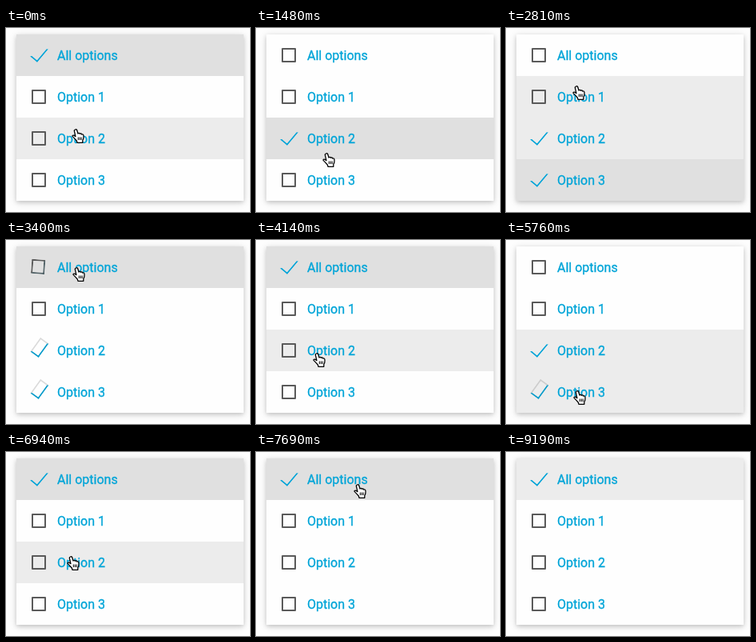
These frames come from a looping animation (305x230 px, 9290 ms). An HTML page:

```html
<!DOCTYPE html>
<html lang="en">
<head>
<meta charset="utf-8">
<title>Option list</title>
<style>
  html, body { margin: 0; width: 100%; height: 100%; overflow: hidden; background: #fdfdfd; }
  #list {
    position: absolute; left: 13px; top: 8px; width: 284px; height: 208px; background: #fefefe;
    box-shadow: 0 2px 5px rgba(0,0,0,.16), 0 2px 10px rgba(0,0,0,.12);
  }
  .row {
    position: relative; height: 52px; padding-left: 51px; white-space: nowrap;
    font: 400 16px/54px Roboto, sans-serif; color: #03a5d8; -webkit-text-stroke: .35px;
  }
  .box {
    position: absolute; box-sizing: border-box; border: 2px solid; border-radius: 1px;
    transform-origin: 100% 100%;
  }
  #hand { position: absolute; left: -1px; top: 0; }
</style>
</head>
<body>
<div id="list"></div>
<svg id="hand" width="17" height="19" fill="#fff" stroke="#000" stroke-width="1.3" stroke-linejoin="round">
  <path d="M4.5 1C5.5.4 6.5 1 6.8 2L8 6C8.6 5.2 10 5.3 10.4 6.3C11 5.6 12.4 5.8 12.7 7C13.6 6.5 14.8 7 14.9 8.3C15.2 11 14.8 13 13.8 14.5V17.3H7L6.3 15C5 13.5 3 11.2 1.3 9.6C.6 8.6 1.8 7.7 3 8.3L4.9 9.6L3.4 2.8C3.2 2 3.6 1.3 4.5 1Z"/>
  <path d="M8.3 10.5V14M10.3 10.5V14M12.2 10.5V14" stroke-width="1"/>
</svg>
<script>
const LOOP = 9290, TICK = 147.5, ROW = 52;
const BLUR_TIME = 9190, LEAVE_TICK = 53;
const WHITE = '#fefefe', LIGHT = '#ececec', DARK = '#e0e0e0';

// The pointer glides to each place between two ticks, and clicks what lies under it.
const glides = [
  { from: 0, to: 2, x: 84, y: 131 },
  { from: 8, to: 12, x: 84, y: 181 },
  { from: 15, to: 21, x: 84, y: 34 },
  { from: 27, to: 28, x: 72, y: 141 },
  { from: 28, to: 30, x: 76, y: 130 },
  { from: 33, to: 36, x: 85, y: 188 },
  { from: 39, to: 41, x: 77, y: 130 },
  { from: 50, to: 52, x: 123, y: 40 }
];
const clicks = [4, 12, 23, 31, 36, 39, 45];

const list = document.getElementById('list'), hand = document.getElementById('hand');
const mix = (a, b, p) => a + (b - a) * p;
const ease = p => p * p * (3 - 2 * p);

const rows = ['All options', 'Option 1', 'Option 2', 'Option 3'].map(label => {
  const row = document.createElement('div'), box = document.createElement('span');
  row.className = 'row';
  box.className = 'box';
  row.append(box, label);
  list.append(row);
  return { row, box };
});

function pointerAt(tick) {
  let x = 83, y = 126;
  for (const g of glides) {
    const p = ease(Math.min(1, Math.max(0, (tick - g.from) / (g.to - g.from))));
    x = mix(x, g.x, p);
    y = mix(y, g.y, p);
  }
  return { x, y, row: Math.floor((y - 6) / ROW) };
}

// "All options" excludes the others, and returns when none of them is left.
function stateAt(tick) {
  const items = rows.map((_, i) => ({ on: i === 0, since: -9 }));
  let focus = 0;
  for (const click of clicks.filter(c => c <= tick)) {
    const set = (i, on) => {
      if (items[i].on === on) return;
      items[i] = { on, since: click };
      if (on) focus = i;
    };
    const target = pointerAt(click).row;
    if (target === 0) items.forEach((_, i) => set(i, i === 0));
    else {
      set(target, !items[target].on);
      set(0, !items.slice(1).some(item => item.on));
    }
  }
  return { items, focus };
}

// The square narrows and turns into a tick as p goes from 0 to 1.
function drawBox({ style }, p) {
  const edge = `rgba(90,90,90,${Math.min(1, 2 * (1 - p))})`;
  const stroke = `rgb(${mix(90, 3, p)},${mix(90, 165, p)},${mix(90, 216, p)})`;
  style.left = mix(19, 14, p) + 'px';
  style.top = mix(17, 13, p) + 'px';
  style.width = mix(18, 12, p) + 'px';
  style.height = mix(18, 22, p) + 'px';
  style.borderColor = `${edge} ${stroke} ${stroke} ${edge}`;
  style.transform = `rotate(${40 * p}deg)`;
}

function draw(time) {
  const tick = Math.floor(time / TICK);
  const pointer = pointerAt(tick), visible = tick < LEAVE_TICK;
  const { items, focus } = stateAt(tick);

  rows.forEach(({ row, box }, i) => {
    const { on, since } = items[i];
    const done = ease(Math.min(1, .2 + (tick - since) * .7));
    drawBox(box, on ? done : 1 - done);
    const focused = i === focus && time < BLUR_TIME;
    const hovered = visible && i === pointer.row;
    row.style.background = on && focused ? DARK : on || focused || hovered ? LIGHT : WHITE;
  });

  hand.style.display = visible ? 'block' : 'none';
  hand.style.transform = `translate(${Math.round(pointer.x)}px,${Math.round(pointer.y)}px)`;
}

const start = performance.now();
function loop() {
  draw((performance.now() - start) % LOOP);
  requestAnimationFrame(loop);
}
loop();
</script>
</body>
</html>
```
